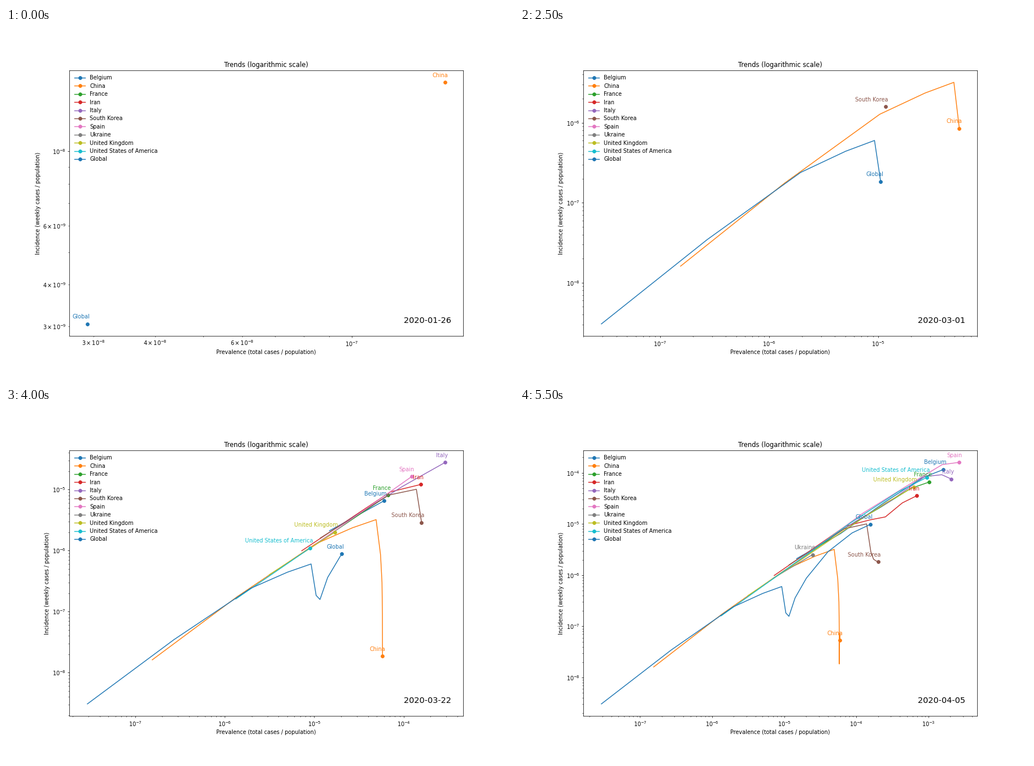
Recreate the animation shown at these times as a matplotlib script. Size 899 px wide and 623 px high, loop 7500 ms.

```python
import numpy as np
import matplotlib.pyplot as plt
from matplotlib.animation import FuncAnimation
from matplotlib.lines import Line2D

W, H, DPI = 899, 623, 69.2
WEEKS, HOLD = 12, 3

# first total, then weekly incidence up to the last week (per billion people)
DATA = {
    "Belgium": (14800, [2100, 6520, 26600, 79000, 116200]),
    "China": (154.7, [16.09, 174, 1276, 2350, 3200, 850, 300,
                      91, 18.4, 46, 73, 53]),
    "France": (10690, [1310, 8070, 21240, 49300, 66200]),
    "Iran": (7250, [987, 9130, 12060, 13760, 25840, 35500]),
    "Italy": (18640, [2480, 11230, 27800, 84800, 91800, 75900]),
    "South Korea": (11650, [1590, 8080, 10050, 2860, 2050, 1910, 1825]),
    "Spain": (9210, [1110, 16280, 58600, 144700, 160500]),
    "Ukraine": (6970, [865, 2515]),
    "United Kingdom": (3130, [398, 2000, 8330, 25930, 53300]),
    "United States of America": (1330, [160, 1099, 10400, 42800, 82000]),
    "Global": (29.15, [3.05, 34.5, 239, 440, 600, 183, 157,
                       360, 875, 2870, 6700, 9850]),
}

fig = plt.figure(figsize=((W + 1e-6) / DPI, (H + 1e-6) / DPI), dpi=DPI,
                 facecolor="white")
ax = fig.add_axes([0.125, 0.125, 0.775, 0.755])
ax.set(xscale="log", yscale="log", title="Trends (logarithmic scale)",
       xlabel="Prevalence (total cases / population)",
       ylabel="Incidence (weekly cases / population)")


def legend_row(row, name, color):
    """Draw one legend entry at fixed pixel positions."""
    y = 88 + 14.4 * row
    flip = 1 - y / H
    fig.add_artist(Line2D([121 / W, 140.3 / W], [flip, flip], color=color))
    fig.add_artist(Line2D([130.7 / W], [flip], color=color, marker="o"))
    fig.text(148 / W, 1 - (y + 3.4) / H, name, va="baseline")


class Trend:
    def __init__(self, row, name, first, weekly):
        color = f"C{row % 10}"
        inc = np.array(weekly, float)
        self.y = inc * 1e-9
        self.x = (first + 7 * (np.cumsum(inc) - inc[0])) * 1e-9
        self.start = WEEKS - len(inc)
        self.line, = ax.plot([], [], color=color, marker="o", markevery=[-1])
        self.label = ax.annotate(name, (1, 1), xytext=(5, 10),
                                 textcoords="offset points", ha="right",
                                 va="baseline", color=color)
        legend_row(row, name, color)

    def show(self, week):
        n = max(0, week - self.start + 1)
        self.line.set_data(self.x[:n], self.y[:n])
        self.line.set_visible(n > 0)
        self.label.set_visible(n > 0)
        if n:
            self.label.xy = self.x[n - 1], self.y[n - 1]


trends = [Trend(i, name, *d) for i, (name, d) in enumerate(DATA.items())]
date = ax.text(0.97, 0.05, "", transform=ax.transAxes, ha="right",
               va="baseline", fontsize=15)


def update(i):
    week = min(i, WEEKS - 1)
    for t in trends:
        t.show(week)
    ax.relim()
    ax.autoscale_view()
    # the date stops one week before the data
    date.set_text(str(np.datetime64("2020-01-26") + 7 * min(week, WEEKS - 2)))
    return []


anim = FuncAnimation(fig, update, frames=WEEKS + HOLD, interval=500,
                     init_func=lambda: update(0), repeat=True, repeat_delay=0)
plt.show()
```
